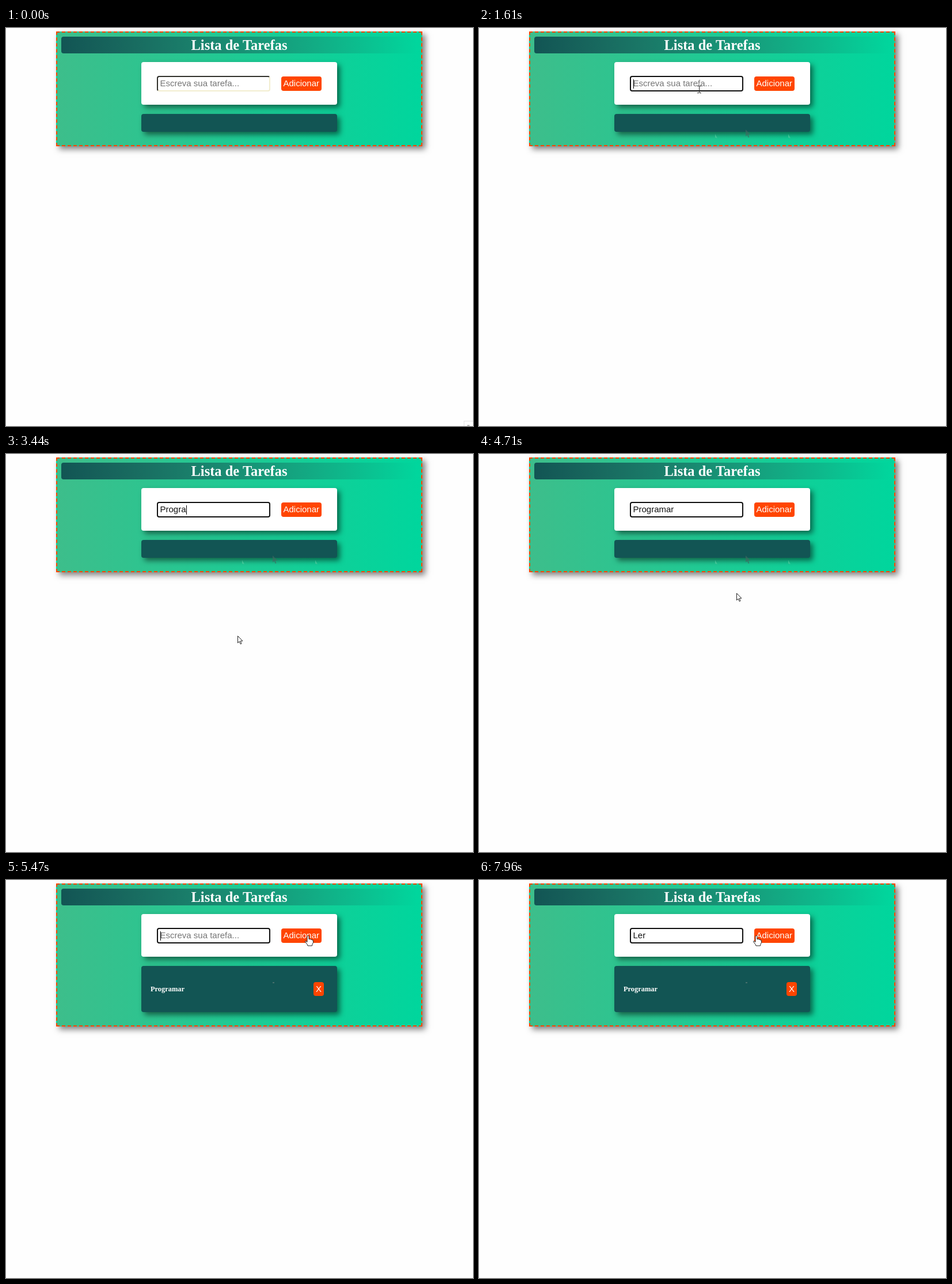
These frames come from a looping animation (811 px wide and 690 px high, 8000 ms). An HTML page with a canvas:

```html
<!DOCTYPE html>
<html lang="pt-BR">
<head>
<meta charset="utf-8">
<title>Lista de Tarefas</title>
<style>
  html, body { margin: 0; width: 100%; height: 100%; overflow: hidden; background: #fefefe; }
  body > *, main * { position: absolute; box-sizing: border-box; }
  main { left: 0; top: 0; width: 811px; height: 690px; overflow: hidden;
    font: 15px 'Liberation Sans', Arial, sans-serif; white-space: pre; }
  canvas { left: 0; top: 0; }
  #app { left: 87px; top: 6px; width: 636px; border: 2px dashed #ff4500;
    background: linear-gradient(to right, #3dbe8b, #00d69d); }
  #app, .card { box-shadow: 5px 5px 10px rgba(0, 0, 0, .5); }
  h1 { left: 96px; top: 15px; width: 618px; height: 29px; margin: 0; border-radius: 4px;
    background: linear-gradient(to right, #125554, rgba(18, 85, 84, 0));
    color: #fff; text-align: center;
    font: bold 24.5px/29px 'Liberation Serif', Times, serif; }
  .card { left: 235px; width: 340px; border-radius: 4px; }
  #form { top: 59px; height: 74px; background: #fff; }
  #list { top: 149px; background: #125554; }
  #field { left: 262px; top: 83px; width: 197px; height: 27px; border-radius: 4px; background: #fff;
    border: 2px inset; border-color: #85857a #f2edcf #f2edcf #85857a; }
  #field.focus { border: 2px solid #101010; }
  #text { left: 267.5px; top: 87px; line-height: 17px; }
  #caret { top: 89px; width: 1px; height: 16px; background: #000; }
  .button { background: #ff4500; border-radius: 4px; color: #fff; text-align: center; line-height: 17px; }
  #add { left: 477.5px; top: 84px; width: 70.5px; height: 25px; padding-top: 3px; }
  #remove { left: 534px; top: 177px; width: 18px; height: 24px; padding-top: 3px; }
  #task { left: 251px; top: 182px; color: #fff; line-height: 14px;
    font: bold 12.4px/14px 'Liberation Serif', Times, serif; }
  #corner { left: 795px; top: 681px; width: 20px; height: 20px; border: 1px solid #e2e2e2; }
  #corner i { left: 5px; top: 6px; width: 4px; height: 3px; background: #bbb; }
</style>
</head>
<body>
<main>
  <div id="app"></div>
  <h1>Lista de Tarefas</h1>
  <div id="form" class="card"></div>
  <div id="field"></div>
  <span id="text"></span>
  <div id="caret"></div>
  <div id="add" class="button">Adicionar</div>
  <div id="list" class="card"></div>
  <b id="task">Programar</b>
  <div id="remove" class="button">X</div>
  <div id="corner"><i></i></div>
</main>
<canvas id="pointer" width="811" height="690"></canvas>
<script>
const LOOP = 8000, ADDED = 5470;
const el = id => document.getElementById(id);
const ctx = el('pointer').getContext('2d');
const measure = document.createElement('canvas').getContext('2d');
measure.font = "15px 'Liberation Sans', Arial, sans-serif";

// Key press times for each typed word
const words = [
  { text: 'Programar', keys: [2480, 2810, 2880, 3010, 3180, 3440, 3620, 3690, 4030], end: ADDED },
  { text: 'Ler', keys: [6880, 7280, 7350], end: LOOP }
];
// Intervals in which the caret is lit
const caretOn = [[1150, 1680], [2150, 4520], [ADDED, 6020], [6550, 7820]];
const clicks = [[1150, 1220, 382, 107], [5400, ADDED, 524, 96]];
const moves = [
  { from: 460, to: 1080, steps: 10, path: [[537, 187], [463, 176], [410, 187], [382, 107]] },
  { from: 1680, to: 1750, steps: 2, path: [[392, 215], [402, 315]] },
  { from: 4590, to: 5200, steps: 9, path: [[412, 296], [505, 150], [530, 62], [524, 97]] },
  { from: 5600, to: 6020, steps: 7, path: [[508, 97], [382, 95]] },
  { from: 7750, to: 7960, steps: 4, path: [[402, 95], [481, 97]] }
];

const within = (t, [a, b]) => t >= a && t < b;

function along(path, u) {
  const s = u * (path.length - 1), i = Math.min(path.length - 2, Math.floor(s));
  return [0, 1].map(k => path[i][k] + (path[i + 1][k] - path[i][k]) * (s - i));
}

function pointerAt(t) {
  const m = moves.filter(m => t >= m.from).pop();
  if (!m) return null;
  const last = m.steps - 1;
  const step = Math.min(last, Math.floor((t - m.from) / (m.to - m.from) * last + 1e-6));
  return along(m.path, step / last);
}

function shape(x, y, points, fill, stroke) {
  ctx.beginPath();
  points.forEach(([px, py]) => ctx.lineTo(x + px, y + py));
  ctx.closePath();
  ctx.fillStyle = fill;
  ctx.fill();
  if (stroke) {
    ctx.strokeStyle = stroke;
    ctx.lineWidth = 1;
    ctx.lineJoin = 'round';
    ctx.stroke();
  }
}

const ARROW = [[0, 0], [0, 12], [2.7, 9.5], [4.7, 14], [6.5, 13.2], [4.6, 8.8], [8.4, 8.6]];
const HAND = [[-1.5, 0], [0, -1], [1.5, 0], [1.5, 5], [4, 5], [6.5, 6], [8.8, 7.2], [9, 11],
  [7.5, 14], [7, 16.5], [-.5, 16.5], [-1.5, 14], [-5, 9.5], [-4.2, 8], [-1.5, 10]];

function drawBeam(x, y) {
  ctx.fillStyle = '#222';
  ctx.fillRect(x, y - 5, 1, 10);
  for (const dy of [-7, 5]) {
    ctx.fillRect(x - 3, y + dy, 3, 1);
    ctx.fillRect(x + 1, y + dy, 3, 1);
  }
  ctx.fillRect(x, y - 6, 1, 1);
  ctx.fillRect(x, y + 4, 1, 1);
}

function drawPointer(t) {
  ctx.clearRect(0, 0, 811, 690);
  // Faint trail left behind by the pointer
  if (within(t, [700, ADDED])) {
    shape(463, 176, ARROW, 'rgba(65,105,95,.65)');
    for (const x of [410, 537]) shape(x, 184, [[0, 0], [0, 6], [4, 7]], 'rgba(90,205,160,.6)');
  } else if (t >= ADDED) {
    ctx.fillStyle = '#47706c';
    ctx.fillRect(463, 177, 3, 2);
  }
  for (const [from, to, x, y] of clicks) {
    if (!within(t, [from, to])) continue;
    ctx.fillStyle = 'rgba(255,190,0,.8)';
    ctx.beginPath();
    ctx.arc(x, y, 9, 0, 7);
    ctx.fill();
  }
  const p = pointerAt(t);
  if (!p) return;
  const [x, y] = p.map(Math.round);
  const inRow = y >= 83 && y < 110;
  if (inRow && x >= 262 && x < 459) drawBeam(x, y);
  else if (inRow && x >= 477 && x < 548) shape(x + .5, y + .5, HAND, '#fff', '#222');
  else shape(x + .5, y + .5, ARROW, '#fff', '#222');
}

function render(t) {
  const added = t >= ADDED;
  const word = words.find(w => t >= w.keys[0] && t < w.end);
  const typed = word ? word.text.slice(0, word.keys.filter(k => t >= k).length) : '';
  el('text').textContent = typed || 'Escreva sua tarefa...';
  el('text').style.color = typed ? '#111' : '#757575';
  el('caret').style.left = Math.round(267.5 + measure.measureText(typed).width) + 'px';
  el('caret').hidden = !caretOn.some(span => within(t, span));
  el('field').className = t >= 1150 && !within(t, [5400, ADDED]) ? 'focus' : '';
  el('app').style.height = (added ? 248 : 199) + 'px';
  el('list').style.height = (added ? 80 : 31) + 'px';
  el('task').hidden = el('remove').hidden = !added;
  el('corner').hidden = t >= 70;
  drawPointer(t);
}

const start = performance.now();
function tick() {
  render((performance.now() - start) % LOOP);
  requestAnimationFrame(tick);
}
tick();
</script>
</body>
</html>
```
